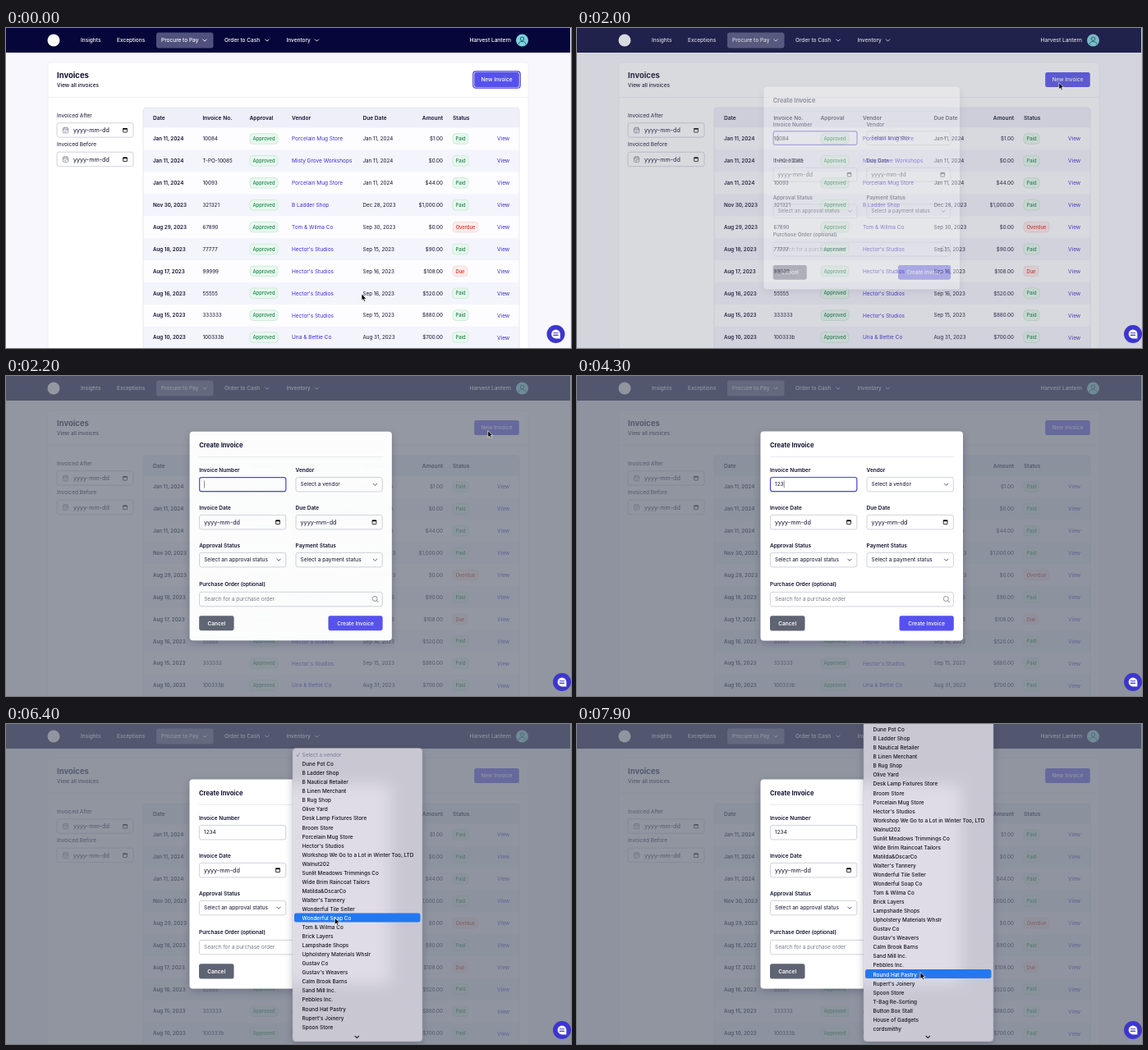
An HTML page that plays this animation: 688x390 px, repeating every 8000 ms.

```html
<!DOCTYPE html>
<html lang="en">
<head>
<meta charset="utf-8">
<title>Create invoice</title>
<style>
html, body { margin: 0; width: 100%; height: 100%; overflow: hidden; background: #f8f7fd; }
svg { display: block; width: 688px; height: 390px; font-family: Inter, "Open Sans", sans-serif; }
text { white-space: pre; }
</style>
</head>
<body>
<svg id="stage" viewBox="0 0 688 390">
  <defs>
    <filter id="shadow" x="-20%" y="-20%" width="140%" height="140%">
      <feDropShadow dx="0" dy="3" stdDeviation="5" flood-color="#14163a" flood-opacity=".22"/>
    </filter>
    <filter id="blur" x="-30%" y="-30%" width="160%" height="160%"><feGaussianBlur stdDeviation="9"/></filter>
    <clipPath id="menuClip"><rect id="clipBox" x="349" width="158" rx="4"/></clipPath>
    <clipPath id="listClip"><rect x="349" y="0" width="158" height="376"/></clipPath>
  </defs>
  <g id="page"></g>
  <rect id="dim" width="688" height="390" fill="#6b7280"/>
  <g id="modal"></g>
  <g id="chat"></g>
  <g id="menu"></g>
  <path id="cursor" d="M0 0V8.3L1.9 6.6 3.2 9.4 4.6 8.8 3.4 6H6Z" fill="#000" stroke="#fff" stroke-width=".7"/>
</svg>
<script>
const $ = id => document.getElementById(id);
const INK = '#10102f', LINK = '#3a2cd0', INDIGO = '#5651ee', MUTED = '#747887';

function add(parent, tag, attrs, content) {
  const el = document.createElementNS('http://www.w3.org/2000/svg', tag);
  for (const k in attrs) el.setAttribute(k, attrs[k]);
  if (content !== undefined) el.textContent = content;
  return parent.appendChild(el);
}
const box = (p, x, y, width, height, fill, more = {}) =>
  add(p, 'rect', { x, y, width, height, fill, ...more });
// y is the middle of the capitals
const label = (p, x, y, str, size = 6.5, fill = INK, weight = 400, anchor = 'start') =>
  add(p, 'text', { x, y: y + size * .364, 'font-size': size, fill, 'font-weight': weight, 'text-anchor': anchor }, str);
const line = (p, d, stroke = INK, width = .9) =>
  add(p, 'path', { d, stroke, fill: 'none', 'stroke-width': width, 'stroke-linecap': 'round', 'stroke-linejoin': 'round' });
const chevron = (p, x, y, color) => line(p, `M${x - 2.2} ${y - 1.1}l2.2 2.2 2.2-2.2`, color);
const field = (p, x, y, w) =>
  box(p, x, y, w, 17.5, '#fff', { rx: 2.5, stroke: '#c5c8d3', 'stroke-width': .8 });

function pickerIcon(p, x, y) {
  box(p, x - 2.4, y - 2, 4.8, 4.6, 'none', { stroke: '#000', 'stroke-width': .8, rx: .4 });
  box(p, x - 2.6, y - 2.4, 5.2, 1.6, '#000');
}
function badge(p, x, y, w, str, good) {
  box(p, x, y - 6.3, w, 12.6, good ? '#e9f9ef' : '#fdecea',
    { rx: 4, stroke: good ? '#bde7cb' : '#f7d3ce', 'stroke-width': .7 });
  label(p, x + w / 2, y, str, 5.8, good ? '#17834a' : '#cf3527', 500, 'middle');
}

const page = $('page'), modal = $('modal'), menu = $('menu');

function buildPage() {
  box(page, 0, 0, 688, 390, '#f8f7fd');
  box(page, 0, 0, 687, 30, '#06063a');
  add(page, 'circle', { cx: 58, cy: 15, r: 7.5, fill: '#fff' });
  box(page, 183, 5.5, 69.5, 19, '#50517d', { rx: 3 });
  [[91, 'Insights'], [135, 'Exceptions'], [189, 'Procure to Pay', 242], [266, 'Order to Cash', 318], [341.5, 'Inventory', 378.5]]
    .forEach(([x, str, arrow]) => {
      label(page, x, 15, str, 6.5, '#fff', 500);
      if (arrow) chevron(page, arrow, 15, '#fff');
    });
  label(page, 615, 15, 'Harvest Lantern', 6.6, '#fff', 500, 'end');
  add(page, 'circle', { cx: 628.5, cy: 15, r: 7.5, fill: '#7fd3dc' });
  add(page, 'circle', { cx: 628.5, cy: 13.2, r: 2.2, fill: 'none', stroke: '#10566b' });
  line(page, 'M624.3 19.6q0-3.2 4.2-3.2t4.2 3.2', '#10566b');

  box(page, 51, 42, 585, 360, '#fff', { rx: 3, stroke: '#ececf4', 'stroke-width': .8 });
  line(page, 'M51 84.5H636', '#ececf3', .8);
  label(page, 62, 57.5, 'Invoices', 9.5, INK, 700);
  label(page, 62, 69.5, 'View all invoices', 6.45, INK, 500);
  box(page, 568.8, 52.8, 57.4, 20.4, '#fff', { id: 'ring', rx: 3.5, stroke: '#3f39c9', 'stroke-width': 1.2 });
  box(page, 570.2, 54, 54.6, 18, INDIGO, { rx: 2.5 });
  label(page, 597.5, 63, 'New Invoice', 6.5, '#fff', 500, 'middle');

  [['Invoiced After', 106.5], ['Invoiced Before', 142]].forEach(([str, y]) => {
    label(page, 62, y, str, 6.5);
    field(page, 62, y + 9.2, 93);
    const mid = y + 18;
    box(page, 69.4, mid - 2.8, 6.2, 6.2, 'none', { rx: 1, stroke: MUTED, 'stroke-width': .7 });
    line(page, `M69.4 ${mid - .8}h6.2M71 ${mid - 3.6}v1.4M74 ${mid - 3.6}v1.4M71.2 ${mid + 1.2}l1 .9 1.8-1.8`, MUTED, .7);
    label(page, 82, mid, 'yyyy-mm-dd', 7.2);
    pickerIcon(page, 145, mid);
  });

  box(page, 167, 97, 458, 300, '#fdfdff', { rx: 4 });
  add(page, 'path', { d: 'M167 121.6V101q0-4 4-4H621q4 0 4 4V121.6Z', fill: '#efeff9' });
  [[179, 'Date'], [239.5, 'Invoice No.'], [296.5, 'Approval'], [348, 'Vendor'], [434.5, 'Due Date'], [544, 'Status']]
    .forEach(([x, str]) => label(page, x, 109.5, str, 6.6, INK, 600));
  label(page, 532, 109.5, 'Amount', 6.6, INK, 600, 'end');
  [
    ['Jan 11, 2024', '10084', 'Porcelain Mug Store', 'Jan 11, 2024', '$1.00', 'Paid'],
    ['Jan 11, 2024', 'T-PO-10085', 'Misty Grove Workshops', 'Jan 11, 2024', '$0.00', 'Paid'],
    ['Jan 11, 2024', '10093', 'Porcelain Mug Store', 'Jan 11, 2024', '$44.00', 'Paid'],
    ['Nov 30, 2023', '321321', 'B Ladder Shop', 'Dec 28, 2023', '$1,000.00', 'Paid'],
    ['Aug 29, 2023', '67890', 'Tom & Wilma Co', 'Sep 30, 2023', '$0.00', 'Overdue'],
    ['Aug 18, 2023', '77777', "Hector's Studios", 'Sep 15, 2023', '$90.00', 'Paid'],
    ['Aug 17, 2023', '99999', "Hector's Studios", 'Sep 16, 2023', '$108.00', 'Due'],
    ['Aug 16, 2023', '55555', "Hector's Studios", 'Sep 16, 2023', '$520.00', 'Paid'],
    ['Aug 15, 2023', '333333', "Hector's Studios", 'Sep 15, 2023', '$880.00', 'Paid'],
    ['Aug 10, 2023', '100333b', 'Una & Bettie Co', 'Aug 31, 2023', '$700.00', 'Paid']
  ].forEach(([date, number, vendor, due, amount, status], i) => {
    const y = 135 + 26.9 * i;
    if (i % 2) box(page, 167, y - 13.4, 458, 26.9, '#f4f4fc');
    label(page, 179, y, date, 6.25, INK, 600);
    label(page, 239.5, y, number, 6.25);
    badge(page, 297, y, 34, 'Approved', true);
    label(page, 348, y, vendor, 6.5, LINK);
    label(page, 434.5, y, due, 6.25);
    label(page, 532, y, amount, 6.25, INK, 400, 'end');
    badge(page, 544, y, { Paid: 19, Due: 18, Overdue: 31 }[status], status, status === 'Paid');
    label(page, 598, y, 'View', 6.6, LINK);
  });
  box(page, 167, 97, 458, 300, 'none', { rx: 4, stroke: '#e2e2ee', 'stroke-width': .8 });
  box(page, 687, 0, 1, 390, '#e9e9f0');
}

let focusRing, typed, caret;
function buildModal() {
  box(modal, 223.5, 67.5, 246.5, 255, '#fff', { rx: 4, filter: 'url(#shadow)' });
  label(modal, 235, 84.5, 'Create Invoice', 7.6, INK, 700);
  line(modal, 'M235 98.5H459', '#e5e6ec', .8);
  const cell = (x, y, title, hint, kind) => {
    label(modal, x, y, title, 6.5, INK, 600);
    field(modal, x + .4, y + 8.4, 105.4);
    label(modal, x + 6, y + 17, hint, kind === 'date' ? 7.2 : 6.55);
    if (kind === 'date') pickerIcon(modal, x + 96, y + 17);
    if (kind === 'select') chevron(modal, x + 97, y + 17.2, '#444857');
  };
  cell(235, 115, 'Invoice Number', '');
  cell(352.6, 115, 'Vendor', 'Select a vendor', 'select');
  cell(235, 161, 'Invoice Date', 'yyyy-mm-dd', 'date');
  cell(352.6, 161, 'Due Date', 'yyyy-mm-dd', 'date');
  cell(235, 207, 'Approval Status', 'Select an approval status', 'select');
  cell(352.6, 207, 'Payment Status', 'Select a payment status', 'select');
  focusRing = box(modal, 235.5, 123.5, 105.3, 17.1, '#fff', { rx: 2.5, stroke: '#4f47d6', 'stroke-width': 1.2 });
  typed = label(modal, 241, 132, '', 6.5);
  caret = box(modal, 241, 127.5, .6, 9, '#444');
  label(modal, 235, 254, 'Purchase Order (optional)', 6.5, INK, 600);
  field(modal, 235.4, 263.4, 223);
  label(modal, 241, 272, 'Search for a purchase order', 6.5, MUTED);
  add(modal, 'circle', { cx: 449.3, cy: 271.5, r: 3, fill: 'none', stroke: MUTED, 'stroke-width': .8 });
  line(modal, 'M451.5 273.7l2 2', MUTED);
  box(modal, 235, 292.3, 42.5, 18.2, '#5f6473', { rx: 2.5 });
  label(modal, 256.2, 301.4, 'Cancel', 6.5, '#fff', 600, 'middle');
  box(modal, 392.5, 292.3, 66.3, 18.2, INDIGO, { rx: 2.5 });
  label(modal, 425.6, 301.4, 'Create Invoice', 6.5, '#fff', 500, 'middle');
}

const ROW = 11.05, FIRST = 37.8;
const vendors = ['Select a vendor', 'Dune Pot Co', 'B Ladder Shop', 'B Nautical Retailer', 'B Linen Merchant', 'B Rug Shop',
  'Olive Yard', 'Desk Lamp Fixtures Store', 'Broom Store', 'Porcelain Mug Store', "Hector's Studios",
  'Workshop We Go to a Lot in Winter Too, LTD', 'Walnut202', 'Sunlit Meadows Trimmings Co', 'Wide Brim Raincoat Tailors',
  'Matilda&OscarCo', "Walter's Tannery", 'Wonderful Tile Seller', 'Wonderful Soap Co', 'Tom & Wilma Co', 'Brick Layers',
  'Lampshade Shops', 'Upholstery Materials Whslr', 'Gustav Co', "Gustav's Weavers", 'Calm Brook Barns', 'Sand Mill Inc.',
  'Pebbles Inc.', 'Round Hat Pastry', "Rupert's Joinery", 'Spoon Store', 'T-Bag Re-Sorting', 'Button Box Stall',
  'House of Gadgets', 'cordsmithy'];
let panel, list, highlight, items;
function buildMenu() {
  panel = box(menu, 349, 29.5, 158, 357.5, '#c8c7d2', { rx: 4, filter: 'url(#shadow)', stroke: '#9a9cae', 'stroke-width': .5 });
  const glow = add(menu, 'g', { 'clip-path': 'url(#menuClip)' });
  box(glow, 320, 73, 148, 244, '#dfdce5', { filter: 'url(#blur)' });
  list = add(add(menu, 'g', { 'clip-path': 'url(#listClip)' }), 'g', {});
  highlight = box(list, 351, 0, 153.5, 11, '#2378f2', { rx: 2.5 });
  items = vendors.map((name, i) => label(list, 360.5, FIRST + ROW * i, name, 6.45, '#15151f', 500));
  line(list, 'M353.8 38l1.2 1.6 2.2-4', '#83859a', .8);
  line(menu, 'M425 380.4l2.3 2.2 2.3-2.2', '#15151f', 1.1);
}

function buildChat() {
  const chat = $('chat');
  add(chat, 'circle', { r: 11, fill: '#3d36cf' });
  add(chat, 'path', { d: 'M0-5.4A5.4 5.4 0 0 0 0 5.4H5.4V0A5.4 5.4 0 0 0 0-5.4Z', fill: '#fff' });
  line(chat, 'M-2.6-1.2H2.6M-2.6 1.4H2.6', '#3d36cf', 1.1);
}

const path = [[100, 433, 324], [350, 476, 250], [650, 548, 128], [900, 578.5, 75], [1400, 586.8, 66.5], [2300, 586.8, 66.5],
  [2700, 421, 152], [3000, 345.5, 131.5], [5100, 345.5, 131.5], [5550, 387.5, 130.5], [6050, 387.5, 130.5],
  [6400, 400.3, 236], [6900, 403, 373], [7000, 404, 365], [7440, 404, 365], [7600, 417, 270], [7700, 417, 270], [7900, 418, 302.5]];
const clamp = v => Math.max(0, Math.min(1, v));
function cursorAt(t) {
  const i = path.findIndex(k => k[0] > t);
  if (i === 0) return path[0].slice(1);
  if (i < 0) return path[path.length - 1].slice(1);
  const a = path[i - 1], b = path[i], u = (t - a[0]) / (b[0] - a[0]);
  return [a[1] + (b[1] - a[1]) * u, a[2] + (b[2] - a[2]) * u];
}
const show = (el, on) => el.setAttribute('display', on ? 'inline' : 'none');

function render(t) {
  const [x, y] = cursorAt(t);
  $('cursor').setAttribute('transform', `translate(${x} ${y})`);
  show($('cursor'), t < 3800 || t >= 5100);

  show($('ring'), t < 1900);
  $('chat').setAttribute('transform', `translate(${t < 1900 ? 669.5 : 677} 373)`);

  const open = 1 - (1 - clamp((t - 1955) / 350)) ** 3;
  $('dim').setAttribute('opacity', .75 * open);
  show(modal, open > 0);
  modal.setAttribute('opacity', open);
  modal.setAttribute('transform', `translate(346.8 195) scale(${.95 + .05 * open}) translate(-346.8 -195)`);

  const count = [3800, 4000, 4300, 5100].filter(k => t >= k).length;
  typed.textContent = '1234'.slice(0, count);
  caret.setAttribute('x', 241 + (count ? typed.getComputedTextLength() + .2 : 0));
  const blinkOff = (t >= 2500 && t < 3000) || (t >= 3500 && t < 3800) || (t >= 4800 && t < 5100);
  const menuOpen = t >= 5800;
  show(caret, !blinkOff && !menuOpen);
  show(focusRing, !menuOpen);

  show(menu, menuOpen);
  if (!menuOpen) return;
  const scroll = 42 * clamp((t - 7440) / 160);
  const top = 29.5 - scroll;
  for (const el of [panel, $('clipBox')]) {
    el.setAttribute('y', top);
    el.setAttribute('height', 387 - top);
  }
  list.setAttribute('transform', `translate(0 ${-scroll})`);
  const active = Math.round((y + scroll - FIRST) / ROW);
  highlight.setAttribute('y', FIRST + ROW * active - 6.1);
  items.forEach((el, i) => el.setAttribute('fill', i === active ? '#fff' : i ? '#15151f' : '#83859a'));
}

buildPage();
buildModal();
buildMenu();
buildChat();
const start = performance.now();
function tick() {
  render((performance.now() - start) % 8000);
  requestAnimationFrame(tick);
}
tick();
</script>
</body>
</html>
```
